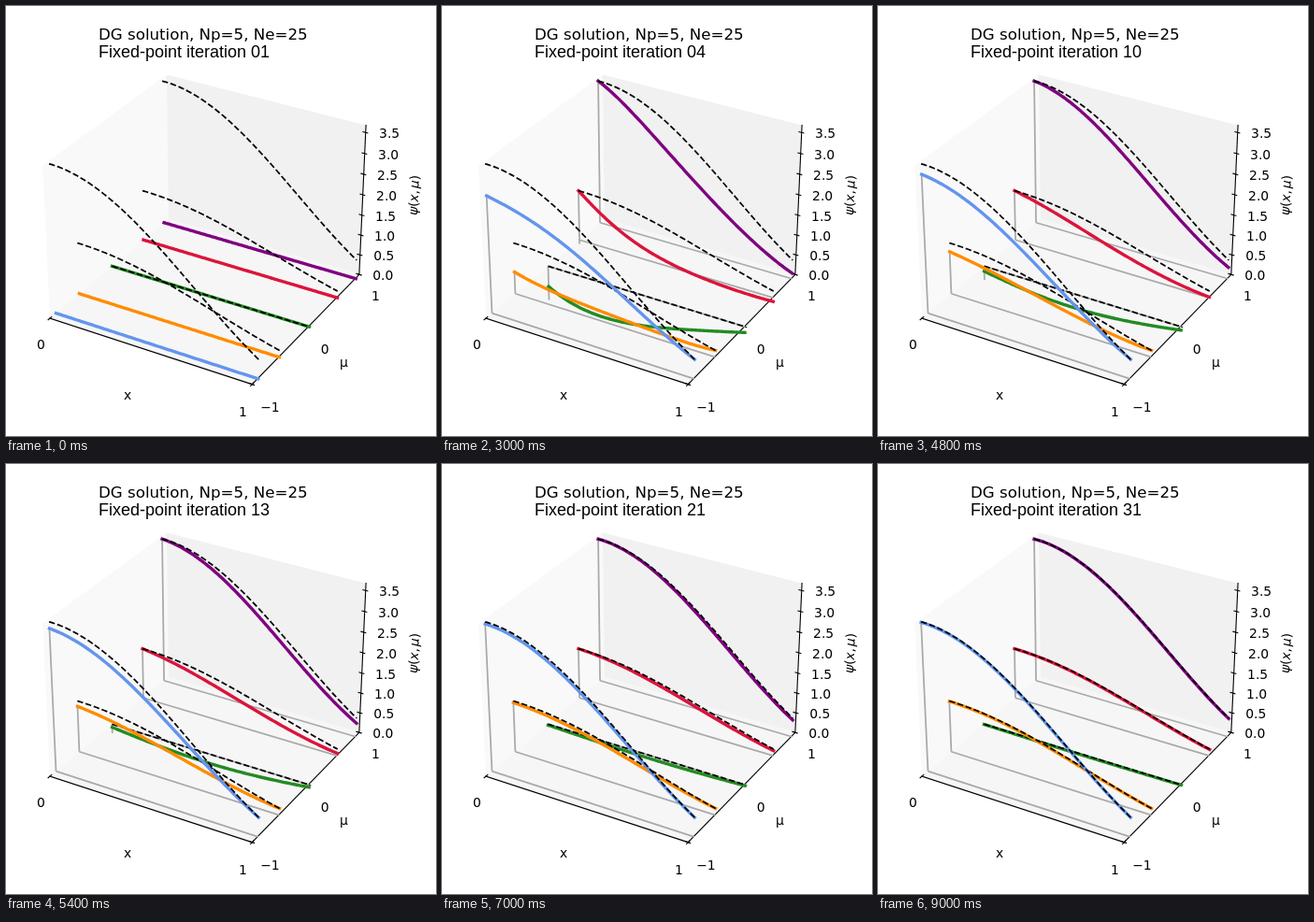
An HTML page with a canvas that plays this animation: 460x460 px, repeating every 9.2 s.

```html
<!DOCTYPE html>
<html lang="en">
<head>
<meta charset="utf-8">
<title>DG solution</title>
<style>
  html, body { margin: 0; width: 100%; height: 100%; overflow: hidden; background: #fff; }
  canvas { display: block; width: 460px; height: 460px; }
</style>
</head>
<body>
<canvas id="plot" width="460" height="460"></canvas>
<script>
const ctx = document.getElementById('plot').getContext('2d');
const SANS = '"DejaVu Sans", sans-serif';
const LOOP = 9200, FRAMES = 31, N = 100;
const RATIO = 0.935, AMP = 4.38;
const X_MAX = 0.997, MU_MAX = 0.985, Z_TOP = 3.67;

// Gauss-Legendre ordinates and half weights, drawn back to front
const RAYS = [
  { mu: 0.9062, w: 0.11846, color: '#800080' },
  { mu: 0.5385, w: 0.23931, color: '#dc143c' },
  { mu: 0, w: 0.28444, color: '#228b22' },
  { mu: -0.5385, w: 0.23931, color: '#ff8c00' },
  { mu: -0.9062, w: 0.11846, color: '#6495ed' }
];

const sigma = x => 4 + 2.5 * x;
const exact = (x, mu) => AMP * mu * mu * (1 - 0.5335 * (1 - Math.cos(2.25 * x)));
const grid = fn => Array.from({ length: N + 1 }, (_, i) => fn(i / N));

// One transport sweep of the error, with zero inflow
function sweep(flux, mu) {
  if (mu === 0) return flux.map(v => RATIO * v);
  const out = new Array(N + 1).fill(0);
  const dir = mu > 0 ? 1 : -1;
  let i = mu > 0 ? 0 : N;
  for (let k = 0; k < N; k++, i += dir) {
    const decay = Math.exp(-sigma((i + dir / 2) / N) / (N * Math.abs(mu)));
    const source = RATIO * (flux[i] + flux[i + dir]) / 2;
    out[i + dir] = out[i] * decay + source * (1 - decay);
  }
  return out;
}

const truth = RAYS.map(r => grid(x => exact(x, r.mu)));

function solve() {
  let error = truth.map(line => line.map(v => -v));
  const all = [];
  for (let n = 0; n < FRAMES; n++) {
    all.push(error.map((line, k) => line.map((e, i) => truth[k][i] + e)));
    const flux = error[0].map((_, i) =>
      RAYS.reduce((sum, r, k) => sum + r.w * error[k][i], 0));
    error = RAYS.map(r => sweep(flux, r.mu));
  }
  return all;
}
const iterates = solve();

// Perspective view: elevation 30, azimuth -60
function project(x, mu, z) {
  const a = (x - 0.5) * 1.19, b = mu * 0.595, c = (z / Z_TOP - 0.5) * 0.893;
  const depth = 10 - (0.433 * a - 0.75 * b + 0.5 * c);
  return [
    216.2 + 2089 * (0.866 * a + 0.5 * b) / depth,
    230.9 - 2089 * (-0.25 * a + 0.433 * b + 0.866 * c) / depth
  ];
}

function trace(points) {
  ctx.beginPath();
  points.forEach(p => ctx.lineTo(...project(...p)));
}

function stroke(points, color, width, cap = 'butt', dash = []) {
  trace(points);
  ctx.strokeStyle = color;
  ctx.lineWidth = width;
  ctx.lineCap = cap;
  ctx.setLineDash(dash);
  ctx.stroke();
}

function pane(points, color) {
  trace(points);
  ctx.fillStyle = color;
  ctx.fill();
}

function label(text, x, y, font = '13.89px ' + SANS, align = 'center') {
  ctx.font = font;
  ctx.textAlign = align;
  ctx.fillStyle = '#000';
  ctx.fillText(text, x, y);
}

function drawBox() {
  const near = [X_MAX, -1, 0], right = [X_MAX, MU_MAX, 0], rightTop = [X_MAX, MU_MAX, Z_TOP];
  const left = [0, -1, 0], leftTop = [0, -1, Z_TOP];
  const back = [0, MU_MAX, 0], backTop = [0, MU_MAX, Z_TOP];
  pane([left, back, backTop, leftTop], '#f9f9f9');
  pane([back, right, rightTop, backTop], '#f1f1f1');
  pane([left, near, right, back], '#f6f6f6');

  const edge = points => stroke(points, '#000', 1.1, 'square');
  edge([left, near]);
  edge([near, right]);
  edge([right, rightTop]);

  const tick = points => stroke(points, '#000', 1.1);
  const sideTick = (mu, z) => tick([[X_MAX - 0.015, mu, z], [X_MAX + 0.012, mu, z]]);
  for (const x of [0, X_MAX]) tick([[x, -1.033, 0], [x, -0.967, 0]]);
  for (const mu of [-1, 0, MU_MAX]) sideTick(mu, 0);
  for (let z = 0; z <= 3.5; z += 0.5) {
    sideTick(MU_MAX, z);
    const [x, y] = project(X_MAX, MU_MAX, z);
    label(z.toFixed(1), x + 25.4, y + 6);
  }
}

function drawZLabel() {
  ctx.save();
  ctx.translate(440, 224);
  ctx.rotate(-87.5 * Math.PI / 180);
  let x = 0;
  const parts = [['ψ', 1, 0], ['(', 0, 0], ['x', 1, 0], [',', 0, 2], ['μ', 1, 0], [')', 0, 0]];
  for (const [glyph, italic, gap] of parts) {
    label(glyph, x, 0, (italic ? 'italic ' : '') + '13.7px ' + SANS, 'left');
    x += ctx.measureText(glyph).width + gap;
  }
  ctx.restore();
}

function drawLabels(step) {
  label('DG solution, Np=5, Ne=25', 99, 36, '16.67px ' + SANS, 'left');
  label('Fixed-point iteration ' + String(step + 1).padStart(2, '0'), 99, 55,
    '18px "Liberation Sans", Arial, sans-serif', 'left');
  label('0', 37.4, 367);
  label('1', 253.5, 439);
  label('−1', 282.4, 434);
  label('0', 341.2, 372);
  label('1', 395.5, 315);
  label('x', 130, 420.5);
  label('μ', 361.5, 385.5);
  drawZLabel();
}

function drawRays(step) {
  RAYS.forEach(({ mu }, k) => {
    const line = iterates[step][k];
    const low = Math.min(0, ...line), high = Math.max(0, ...line);
    stroke([[0, mu, 0], [1, mu, 0]], '#a9a9a9', 1.75);
    if (high - low > 1e-6) stroke([[0, mu, low], [0, mu, high]], '#a9a9a9', 1.75);
  });
  RAYS.forEach(({ mu, color }, k) => {
    const curve = values => values.map((z, i) => [i / N, mu, z]);
    stroke(curve(iterates[step][k]), color, 3.4, 'square');
    stroke(curve(truth[k]), '#000', 1.75, 'butt', [6.4, 2.8]);
  });
}

// The first five steps slow down the start, then one every 200 ms
function stepAt(time) {
  const starts = [1200, 2200, 3000, 3600, 4000];
  if (time < 4000) return starts.filter(s => time >= s).length;
  return Math.min(FRAMES - 1, 5 + Math.floor((time - 4000) / 200));
}

let shown = -1;
const begin = performance.now();
function render() {
  const step = stepAt((performance.now() - begin) % LOOP);
  if (step !== shown) {
    shown = step;
    ctx.fillStyle = '#fff';
    ctx.fillRect(0, 0, 460, 460);
    drawBox();
    drawRays(step);
    drawLabels(step);
  }
  requestAnimationFrame(render);
}
render();
</script>
</body>
</html>
```
